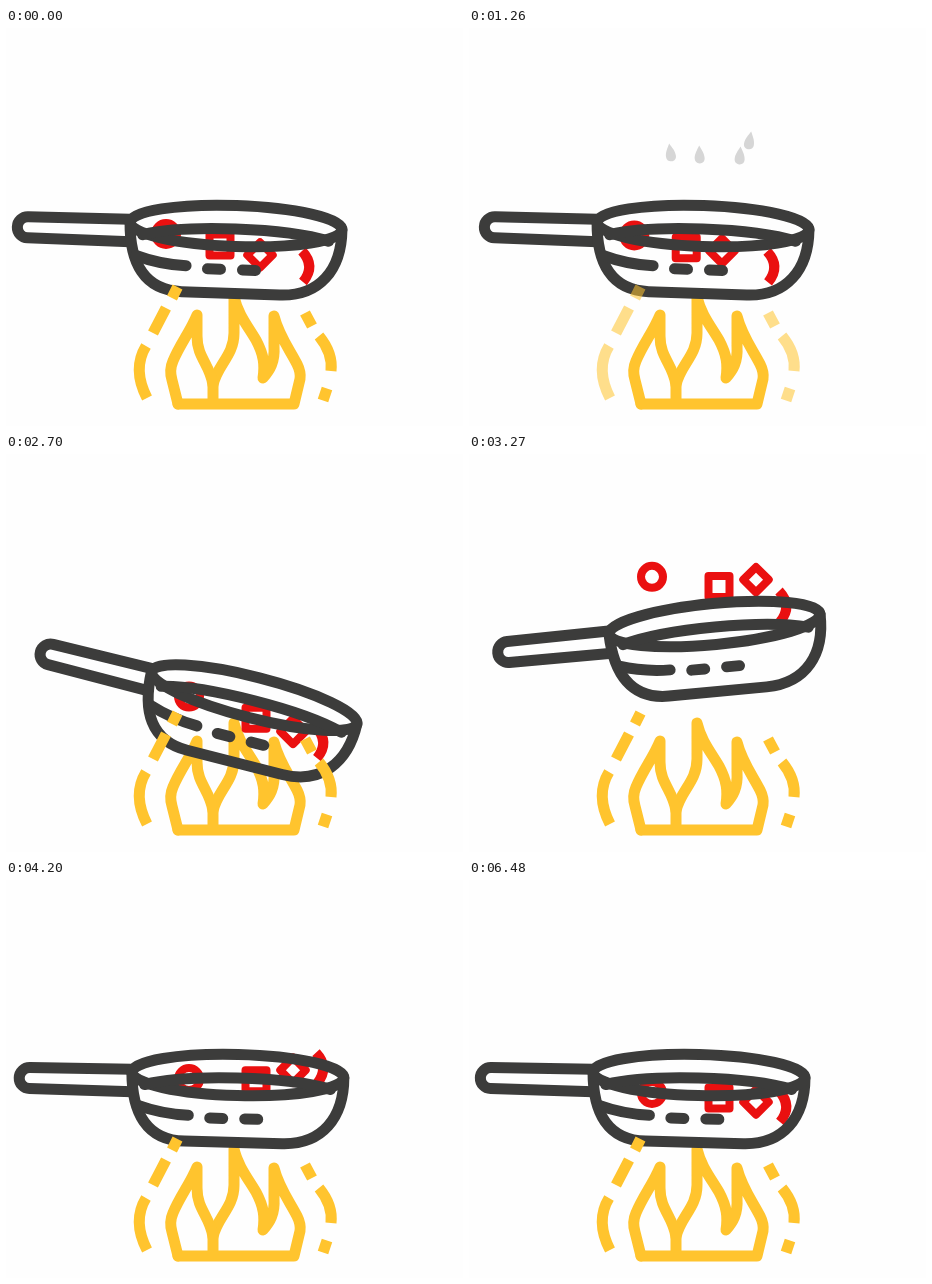
Write an HTML page that moves like this. It is 457x398 px and loops after 6660 ms.

```html
<!DOCTYPE html>
<html lang="en">
<head>
<meta charset="utf-8">
<title>Frying pan</title>
<style>
  html, body { margin: 0; width: 100%; height: 100%; overflow: hidden; background: #fefefe; }
  svg { display: block; width: 457px; height: 398px; }
  path, circle, rect, ellipse { fill: none; }
  #flame, #glow { stroke: #ffc42e; stroke-width: 11; }
  #flame, #pan { stroke-linejoin: round; stroke-linecap: round; }
  #pan { stroke: #3c3c3b; stroke-width: 11; }
  #food { stroke: #ea1010; stroke-width: 8; stroke-linejoin: round; }
  #steam path { fill: #c9c9c9; }
</style>
</head>
<body>
<svg viewBox="0 0 457 398">
  <g id="steam"></g>
  <g id="flame">
    <path d="M172 376H288L294 351Q295 344 291 336C284 322 273 308 268 288V318C269 334 264 342 257 350C259 337 258 327 250 312C241 297 232 286 228 269V305C228 328 211 337 207 357V375"/>
    <path d="M172 376L166 352Q163 342 167 333C174 316 184 304 191 287V308C191 330 204 336 207 357"/>
  </g>
  <g id="food">
    <g><circle r="11"/></g>
    <g><rect x="-10.5" y="-10.5" width="21" height="21"/></g>
    <g><rect x="-9" y="-9" width="18" height="18" transform="rotate(45)"/></g>
    <g><path d="M-4 -15Q10 0 -3 16" stroke-width="10"/></g>
  </g>
  <g id="pan">
    <path d="M-106 -3L-208 -2A10.5 10.5 0 0 0 -208 19L-105 19.5"/>
    <path d="M-106 0C-105 40 -90 67.5 -52 67.5H46C86 67.5 107 40 106 0"/>
    <ellipse rx="106" ry="20.5"/>
    <path d="M-93 12C-50 0 50 0 93 12"/>
    <path d="M-99 33Q-75 41 -48.5 41.5M-27 43.8H-14M8 43.8H21"/>
  </g>
  <g id="glow">
    <path d="M171.5 259L166 270M160 280L147 305M140 318Q126 341 141 370"/>
    <path d="M299 285L306 298M313 308Q327 325 325 343M321 360.5L317 372.5"/>
  </g>
</svg>
<script>
const LOOP = 6660, STEP = 30, LAST = 6480;
const SWING = 720, SWING_END = 3 * SWING;
const $ = id => document.getElementById(id);
const clamp = v => Math.max(0, Math.min(1, v));
const ease = p => (1 - Math.cos(Math.PI * p)) / 2;
const blend = (t, from, to) => ease(clamp((t - from) / (to - from)));
const move = (el, x, y, rest = "") =>
  el.setAttribute("transform", `translate(${x} ${y}) ${rest}`);

// Rest point, offset at the start, slide while the pan swings, toss height
const food = [
  { rest: [183, 213], start: [-23, -7], slide: [36, 10], toss: 190 },
  { rest: [250, 218], start: [-36, -1], slide: [22, 18], toss: 180 },
  { rest: [287, 222], start: [-33, 5], slide: [-7, -27], toss: 203 },
  { rest: [314, 226], start: [-14, 12], slide: [14, 2], toss: 156 }
];

// Position and sideways drift
const drops = [[200, 155, 3], [231, 157, -1], [261, 158, 21], [283, 143, -5]];

for (const _ of drops) {
  const p = document.createElementNS("http://www.w3.org/2000/svg", "path");
  p.setAttribute("d", "M0 -9C2 -5 5 -1 5 4C5 7 3 9 0 9C-3 9 -5 7 -5 4C-5 -1 -2 -5 0 -9Z");
  $("steam").append(p);
}

function drawPan(t, dip) {
  const swing = ease(Math.min(t, SWING_END) / SWING);
  const lift = blend(t, 2730, 3250), settle = blend(t, 3300, 3720);
  const x = 230 + 27.5 * swing - 12 * blend(t, SWING_END, 2950) - 15.5 * blend(t, 3960, 4270);
  const y = 198 + 46 * dip - 74 * lift + 25 * settle;
  const angle = 2 + 12.4 * dip - 19.8 * lift + 6.9 * settle;
  move($("pan"), x, y, `rotate(${angle})`);
}

// Height of the toss from 0 to 1; later pieces land later.
function tossLevel(t, i) {
  const top = 3560, rise = 400, fall = 665 + 8 * i * i;
  const p = (t - top) / (t < top ? rise : fall);
  return Math.max(0, 1 - p * p);
}

function drawFood(t, dip) {
  const sunk = dip - blend(t, 2760, 3160);
  const away = 1 - blend(t, 2 * SWING, SWING_END);
  const swing = ease(Math.min(t, 2 * SWING) / SWING);
  food.forEach(({ rest, start, slide, toss }, i) => {
    const [x, y] = rest.map((v, k) => v + start[k] * away + slide[k] * swing);
    const drop = sunk * (46 + .25 * (x - 248));
    move($("food").children[i], x, y + drop - toss * tossLevel(t, i));
  });
}

function drawSteam(age) {
  $("steam").setAttribute("opacity", clamp((age - 250) / 350) * clamp((1930 - age) / 900));
  drops.forEach(([x, y, drift], i) => {
    const d = age - 750;
    move($("steam").children[i], x + drift * d / 1080, y - .06 * d, `rotate(${6 * i - 8})`);
  });
}

function draw(t) {
  const dip = blend(t, SWING_END, 2730);
  const age = t < 3000 ? t : t - 4300; // heat comes in two waves
  drawPan(t, dip);
  drawFood(t, dip);
  drawSteam(age);
  $("glow").setAttribute("opacity", 1 - .45 * (blend(age, 0, 500) - blend(age, 1900, 2180)));
}

const begin = performance.now();
function tick() {
  const t = (performance.now() - begin) % LOOP;
  draw(Math.min(LAST, Math.floor(t / STEP) * STEP));
  requestAnimationFrame(tick);
}
tick();
</script>
</body>
</html>
```
